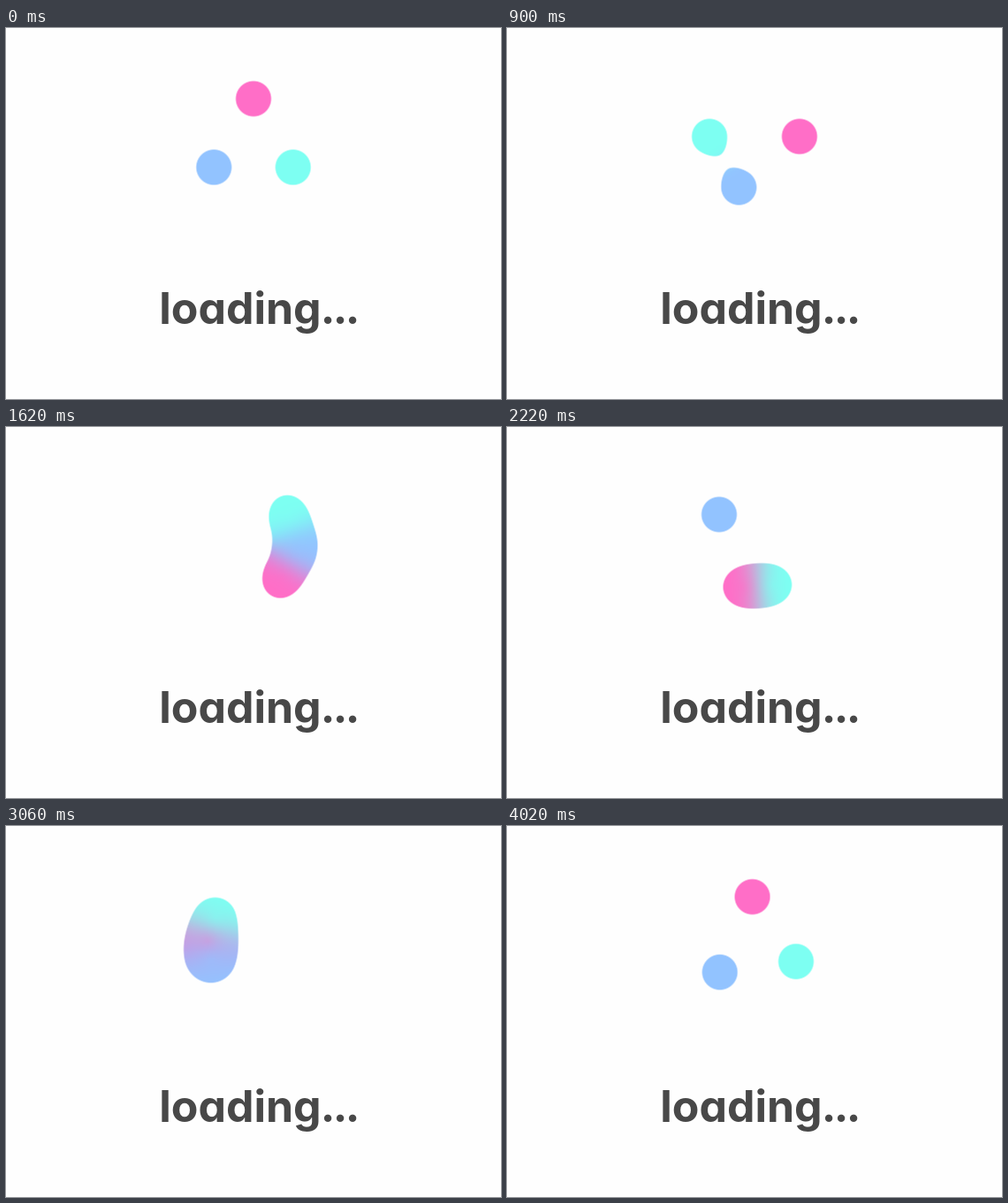
Recreate the animation shown at these times as an HTML page with a canvas. Size 560 by 420 pixels, loop 4.05 s.

```html
<!DOCTYPE html>
<html lang="en">
<head>
<meta charset="utf-8">
<title>loading</title>
<style>
  html, body { margin: 0; width: 100%; height: 100%; overflow: hidden; background: #fefefe; }
  canvas, svg { position: absolute; left: 0; top: 0; display: block; }
  text {
    font: 700 50px Inter, "Open Sans", sans-serif;
    font-feature-settings: "cv11" 1;
    fill: #484848;
  }
  .dots { letter-spacing: -2.7px; }
</style>
</head>
<body>
<canvas id="stage" width="560" height="420"></canvas>
<svg width="560" height="420"><text x="173.2" y="334.7">loading<tspan class="dots" dx="-1">...</tspan></text></svg>
<script>
const ctx = document.getElementById('stage').getContext('2d');
const LOOP = 4050, STEP = 30;
const CX = 280, CY = 131.8, ORBIT = 51.7;
const RADIUS = 20, REACH = 60, SPAN = REACH - RADIUS;
const BOX = { x: 180, y: 30, w: 200, h: 200 };
const BACK = [254, 254, 254];

// Back to front: start angle in degrees from the top, turns per loop
const BALLS = [
  { start: 0, turns: 1, color: [255, 110, 199] },
  { start: 120, turns: 2, color: [125, 255, 242] },
  { start: 240, turns: 4, color: [146, 195, 255] }
];

const image = ctx.createImageData(BOX.w, BOX.h);
const clamp = v => Math.max(0, Math.min(1, v));
const smooth = v => { v = clamp(v); return v * v * (3 - 2 * v); };

// The ball in front absorbs the one behind it as they close in
function absorb(back, front, gain) {
  const gap = Math.hypot(back.x - front.x, back.y - front.y);
  const near = 1 - smooth((gap - 7) / 26);
  const swell = 1 + 0.58 * clamp(1 - gap / 2.4);
  back.pull *= 1 - 0.9 * near;
  front.pull *= 1 + gain * near * swell;
}

function place(time) {
  const balls = BALLS.map(({ start, turns, color }) => {
    const a = (start + 360 * turns * time / LOOP) * Math.PI / 180;
    return { x: CX + ORBIT * Math.sin(a), y: CY - ORBIT * Math.cos(a), color, pull: 1 };
  });
  const [pink, cyan, blue] = balls;
  const slowGap = Math.hypot(pink.x - cyan.x, pink.y - cyan.y);

  // The slow pair settles to a single plain ball when it meets
  absorb(pink, cyan, 0.8 * smooth((slowGap - 2.4) / 4));
  absorb(pink, blue, 0.8);
  absorb(cyan, blue, 0.8);
  return balls;
}

function draw(time) {
  const balls = place(time), data = image.data;
  let i = 0;
  for (let y = 0; y < BOX.h; y++) {
    for (let x = 0; x < BOX.w; x++, i += 4) {
      let field = 0, gx = 0, gy = 0, total = 0, r = 0, g = 0, b = 0;
      for (const ball of balls) {
        const dx = BOX.x + x + 0.5 - ball.x, dy = BOX.y + y + 0.5 - ball.y;
        const dist = Math.hypot(dx, dy) || 0.001;
        if (dist >= REACH) continue;
        const u = (REACH - dist) / SPAN, f = u * u;
        const slope = 2 * u / SPAN * ball.pull / dist;
        field += f * ball.pull;
        gx += slope * dx;
        gy += slope * dy;
        const w = Math.pow(f, 1.35) * ball.pull;
        total += w;
        r += w * ball.color[0];
        g += w * ball.color[1];
        b += w * ball.color[2];
      }
      const edge = Math.max(0.025, Math.hypot(gx, gy)) * 1.7;
      const alpha = field > 1.5 ? 1 : clamp((field - 1) / edge + 0.5);
      const k = total > 0 ? alpha / total : 0;
      data[i] = r * k + BACK[0] * (1 - alpha);
      data[i + 1] = g * k + BACK[1] * (1 - alpha);
      data[i + 2] = b * k + BACK[2] * (1 - alpha);
      data[i + 3] = 255;
    }
  }
  ctx.putImageData(image, BOX.x, BOX.y);
}

let first = null, shown = -1;
function tick(now) {
  if (first === null) first = now;
  const step = Math.floor(((now - first) % LOOP) / STEP + 0.001);
  if (step !== shown) draw((shown = step) * STEP);
  requestAnimationFrame(tick);
}
draw(0);
requestAnimationFrame(tick);
</script>
</body>
</html>
```
